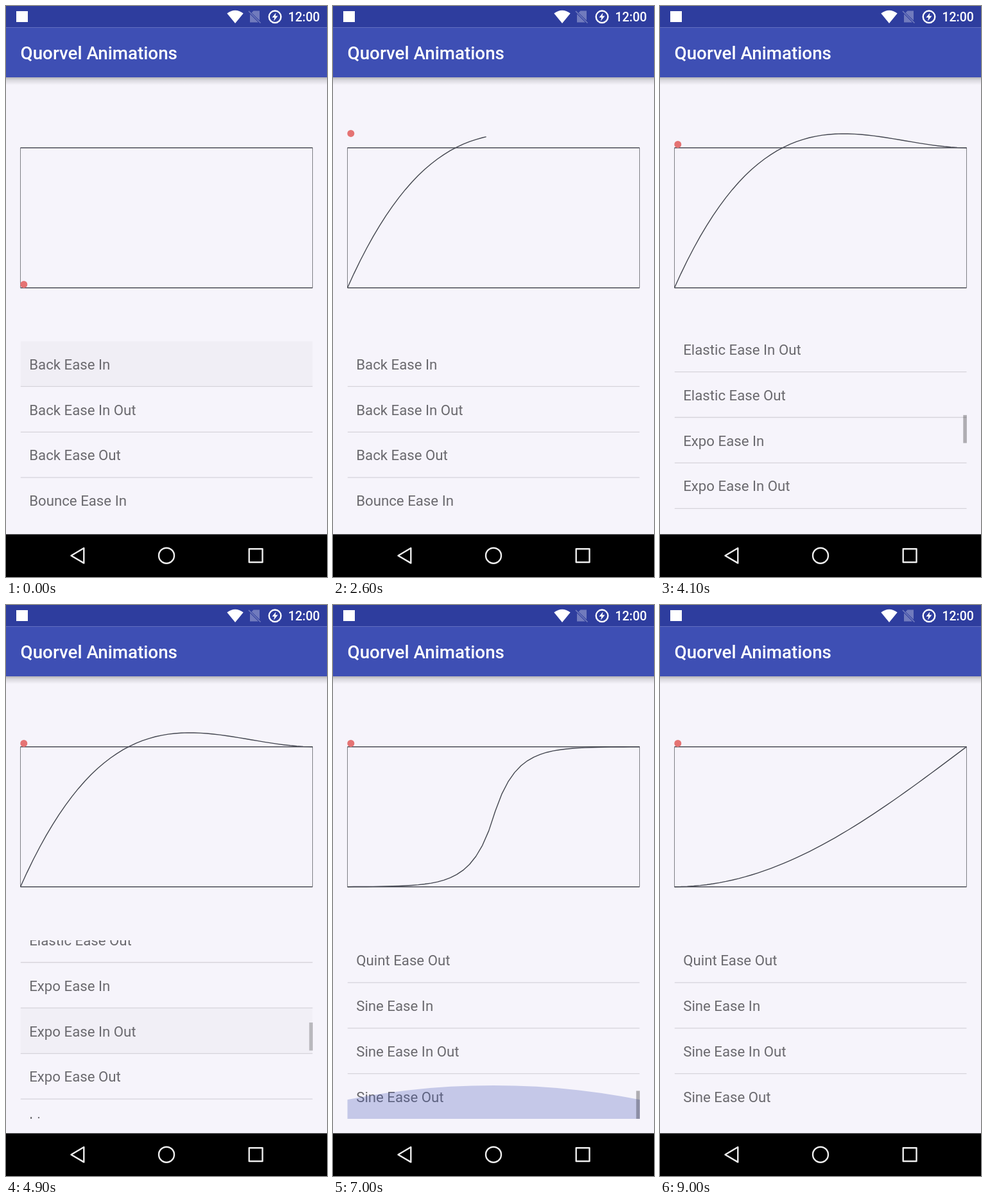
An HTML page with a canvas that plays this animation: 500 by 889 pixels, repeating every 9.1 s.

```html
<!DOCTYPE html>
<html lang="en">
<head>
<meta charset="utf-8">
<title>Easing demo</title>
<style>
  html, body { margin: 0; width: 100%; height: 100%; overflow: hidden; background: #f6f4fb; }
  canvas { display: block; width: 500px; height: 889px; }
</style>
</head>
<body>
<canvas id="stage"></canvas>
<script>
const W = 500, H = 889, LOOP = 9100, STEP = 100;
const canvas = document.getElementById('stage');
const ctx = canvas.getContext('2d');
const ratio = window.devicePixelRatio || 1;
canvas.width = W * ratio;
canvas.height = H * ratio;

const BG = '#f6f4fb';
const BOX = { left: 22.5, right: 477.5, top: 220.7, bottom: 438.7 };
const LIST = { top: 522, bottom: 800, pitch: 70.9 };
const MAX_SCROLL = 1493.4;

const families = ['Back', 'Bounce', 'Circ', 'Elastic', 'Expo', 'Linear', 'Quad', 'Quint', 'Sine'];
const rows = families.flatMap(name => name === 'Linear'
  ? [name]
  : ['In', 'In Out', 'Out'].map(kind => `${name} Ease ${kind}`));

const clamp = (v, a = 0, b = 1) => Math.min(b, Math.max(a, v));
const span = (t, a, b) => clamp((t - a) / (b - a));

const backIn = u => u * u * (2.70158 * u - 1.70158);
const backOut = u => 1 - backIn(1 - u);
const sineIn = u => 1 - Math.cos(u * Math.PI / 2);
function expoInOut(u) {
  if (u <= 0 || u >= 1) return clamp(u);
  return u < 0.5 ? 2 ** (20 * u - 11) : 1 - 2 ** (9 - 20 * u);
}

// Each tap highlights a row, then plays its curve.
const TAP_DELAY = 70, DURATION = 1200;
const taps = [
  { at: -50, row: 0, ease: backIn },
  { at: 1960, row: 2, ease: backOut },
  { at: 4860, row: 13, ease: expoInOut },
  { at: 7660, row: 22, ease: sineIn }
];

function scrollAt(t) {
  if (t <= 3400) return 0;
  if (t <= 3600) return 170.8 * span(t, 3400, 3600) ** 1.5;
  if (t <= 6500) return 170.8 + 645 * (1 - (1 - span(t, 3600, 4520)) ** 2.6);
  if (t <= 6600) return 815.8 + 80.9 * span(t, 6500, 6600);
  return 896.7 + (MAX_SCROLL - 896.7) * (1 - (1 - span(t, 6600, 6950)) ** 1.3);
}

function barAlpha(t) {
  if (t > 3400 && t < 5100) return 1 - span(t, 4850, 5100);
  if (t > 6500 && t < 7600) return 1 - span(t, 7300, 7560);
  return 0;
}

function glowAt(t) {
  if (t < 6930) return 0;
  if (t < 7100) return 0.57 + 0.03 * span(t, 7000, 7100);
  return 0.6 * (1 - span(t, 7100, 7700)) ** 2;
}

function fillRect(color, x, y, w, h) {
  ctx.fillStyle = color;
  ctx.fillRect(x, y, w, h);
}

function poly(points, close) {
  ctx.beginPath();
  points.forEach(([x, y]) => ctx.lineTo(x, y));
  if (close) ctx.closePath();
}

function stroke(color, width) {
  ctx.strokeStyle = color;
  ctx.lineWidth = width;
  ctx.stroke();
}

function line(color, width, ...points) {
  poly(points);
  stroke(color, width);
}

function circle(x, y, r) {
  ctx.beginPath();
  ctx.arc(x, y, r, 0, Math.PI * 2);
}

function text(str, x, y, size, color, weight = 400) {
  ctx.font = `${weight} ${size}px Roboto, sans-serif`;
  ctx.fillStyle = color;
  ctx.fillText(str, x, y);
}

function drawStatusIcons() {
  fillRect('#fff', 16, 8, 18, 17);

  ctx.fillStyle = '#fff';
  ctx.beginPath();
  ctx.moveTo(357, 27);
  ctx.lineTo(344.3, 11.4);
  ctx.quadraticCurveTo(357, 2, 369.7, 11.4);
  ctx.closePath();
  ctx.fill();

  const faint = 'rgba(255,255,255,0.32)';
  ctx.fillStyle = faint;
  poly([[385.5, 7.5], [395, 7.5], [395, 22.5], [382.5, 10.5]], true);
  ctx.fill();
  poly([[380, 12.5], [393, 25.5], [380, 25.5]], true);
  ctx.fill();
  line(faint, 1.6, [378, 8], [396.5, 26.5]);

  circle(419, 16.8, 9.3);
  stroke('#fff', 2.4);
  ctx.fillStyle = '#fff';
  poly([[420.5, 10.5], [414.5, 18], [418.2, 18], [417, 23.5], [423.5, 15.6], [419.6, 15.6]], true);
  ctx.fill();

  text('12:00', 439.5, 24, 19.44, '#fff', 500);
}

function drawHeader() {
  fillRect('#2e3d9e', 0, 0, W, 33.3);
  fillRect('#3e4fb4', 0, 33.3, W, 77.7);
  const shade = ctx.createLinearGradient(0, 111, 0, 123);
  shade.addColorStop(0, 'rgba(0,0,0,0.27)');
  shade.addColorStop(0.35, 'rgba(0,0,0,0.12)');
  shade.addColorStop(1, 'rgba(0,0,0,0)');
  fillRect(shade, 0, 111, W, 12);
  drawStatusIcons();
  text('Quorvel Animations', 22.5, 83, 27.78, '#fff', 500);
}

function drawNav() {
  fillRect('#000', 0, 822.5, W, H - 822.5);
  ctx.lineJoin = 'round';
  poly([[101.5, 855.7], [121.3, 844], [121.3, 867.4]], true);
  stroke('#eee', 2.4);
  circle(250, 855.7, 12);
  stroke('#eee', 2.4);
  ctx.strokeRect(378.7, 845.2, 20.8, 20.8);
}

function drawChart(t) {
  const { left, right, top, bottom } = BOX;
  line('#808086', 1, [left, top], [left, bottom]);
  line('#808086', 1, [right, top], [right, bottom]);
  line('#4c4e56', 1.4, [left, top], [right, top]);
  line('#4c4e56', 1.4, [left, bottom], [right, bottom]);

  const tap = taps.filter(p => t >= p.at + TAP_DELAY).pop();
  let level = 0;
  if (tap) {
    const u = span(t, tap.at + TAP_DELAY, tap.at + TAP_DELAY + DURATION);
    const place = v => [left + (right - left) * v, bottom - (bottom - top) * tap.ease(v)];
    const points = [];
    for (let v = 0; v < u; v += 0.022) points.push(place(v));
    points.push(place(u));
    ctx.lineJoin = 'round';
    line('#43464f', 1.4, ...points);
    level = tap.ease(u);
  }
  circle(27.8, 433.4 - 218 * level, 5.5);
  ctx.fillStyle = '#e57373';
  ctx.fill();
}

function pressAlpha(age) {
  if (age < 0 || age > 600) return 0;
  return 0.06 * span(age, 0, 120) * (1 - span(age, 250, 600));
}

function drawGlow(size) {
  if (size <= 0) return;
  const r = 682.5, depth = 91.4;
  ctx.beginPath();
  ctx.ellipse(250, LIST.bottom + (r - depth) * size, r, r * size, 0, 0, Math.PI * 2);
  ctx.fillStyle = `rgba(63,81,181,${0.27 * Math.min(1, size / 0.57)})`;
  ctx.fill();
}

function drawList(t) {
  const { top, bottom, pitch } = LIST;
  const { left, right } = BOX;
  const view = bottom - top;
  const scroll = scrollAt(t);

  ctx.save();
  ctx.beginPath();
  ctx.rect(left, top, right - left + 0.5, view);
  ctx.clip();

  rows.forEach((name, i) => {
    const y = top + i * pitch - scroll;
    if (y > bottom || y + pitch < top) return;
    for (const tap of taps) {
      const alpha = tap.row === i ? pressAlpha(t - tap.at) : 0;
      if (alpha) fillRect(`rgba(0,0,0,${alpha})`, left, y, right - left, pitch - 0.5);
    }
    text(name, 36.2, y + 43.6, 22.22, '#6a696e');
    if (i < rows.length - 1) {
      line('#d6d4db', 1.3, [left, y + pitch - 0.5], [right, y + pitch - 0.5]);
    }
  });

  drawGlow(glowAt(t));

  const alpha = barAlpha(t);
  if (alpha > 0) {
    const thumb = 43.6;
    const y = top + (view - thumb) * scroll / MAX_SCROLL;
    fillRect(`rgba(0,0,0,${0.29 * alpha})`, 472.3, y, 5.6, thumb);
  }
  ctx.restore();
}

function draw(t) {
  ctx.setTransform(ratio, 0, 0, ratio, 0, 0);
  fillRect(BG, 0, 0, W, H);
  drawHeader();
  drawChart(t);
  drawList(t);
  drawNav();
}

const start = performance.now();
function tick() {
  const t = Math.max(0, performance.now() - start) % LOOP;
  draw(Math.floor(t / STEP) * STEP);
  requestAnimationFrame(tick);
}
tick();
</script>
</body>
</html>
```
